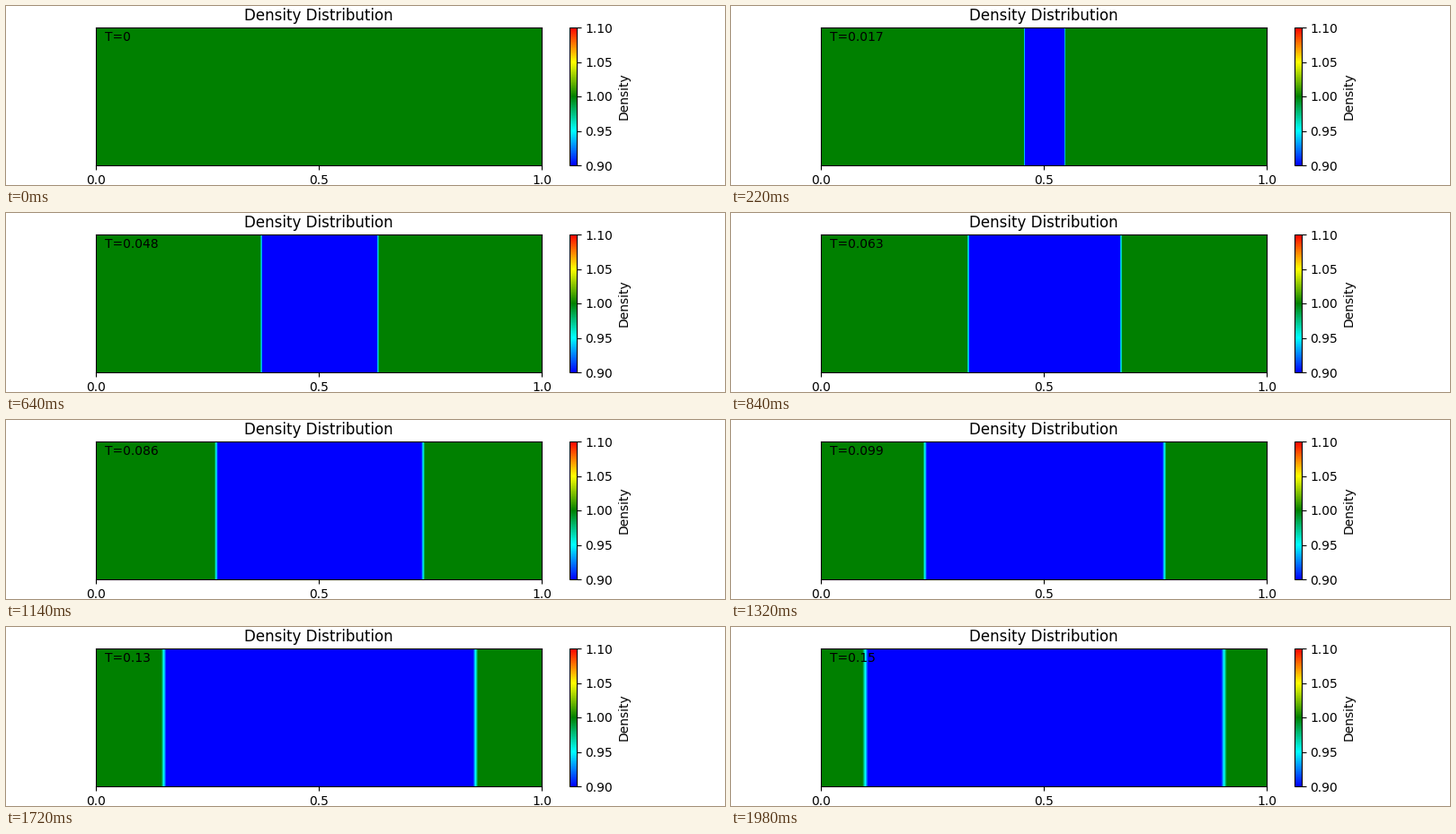
A matplotlib script that plays this animation: 800x200 px, repeating every 2 s.

```python
import numpy as np
import matplotlib.pyplot as plt
from matplotlib.animation import FuncAnimation
from matplotlib.colors import LinearSegmentedColormap

FRAMES, INTERVAL = 100, 20
DT = 0.0015                  # simulated time per frame
RHO_OUT, RHO_IN = 1.0, 0.9
CELLS = 496
CENTER = 248.5               # in cells
HEAD_SPEED, TAIL_SPEED = 2.04, 1.98   # cells per frame

plt.rcParams["font.family"] = "DejaVu Sans"
cmap = LinearSegmentedColormap.from_list(
    "density", ["blue", "cyan", "green", "yellow", "red"], N=257)
dist = np.abs(np.arange(CELLS) + 0.5 - CENTER)


def density(i):
    """Two rarefaction fans that leave the centre and widen with time."""
    if i == 0:
        return np.full((1, CELLS), RHO_OUT)
    head = HEAD_SPEED * i + 0.3
    tail = TAIL_SPEED * i - 0.2
    return np.interp(dist, [tail, head], [RHO_IN, RHO_OUT])[None, :]


def time_label(i):
    # the tiny factor makes exact halves round up
    return f"T={DT * i * (1 + 1e-9):.2g}"


fig, ax = plt.subplots(figsize=(8, 2), dpi=100)
image = ax.imshow(density(0), cmap=cmap, vmin=0.9, vmax=1.1, aspect="auto",
                  extent=(0, 1, 0, 1), interpolation="nearest")
ax.set_title("Density Distribution")
ax.set_xticks([0, 0.5, 1])
ax.set_yticks([])
bar = fig.colorbar(image, ax=ax, ticks=[0.9, 0.95, 1.0, 1.05, 1.1])
bar.set_label("Density")
label = ax.text(0.02, 0.9, time_label(0), transform=ax.transAxes)


def update(i):
    image.set_data(density(i))
    label.set_text(time_label(i))
    return image, label


anim = FuncAnimation(fig, update, frames=FRAMES, interval=INTERVAL,
                     repeat=True, repeat_delay=0)
plt.show()
```
